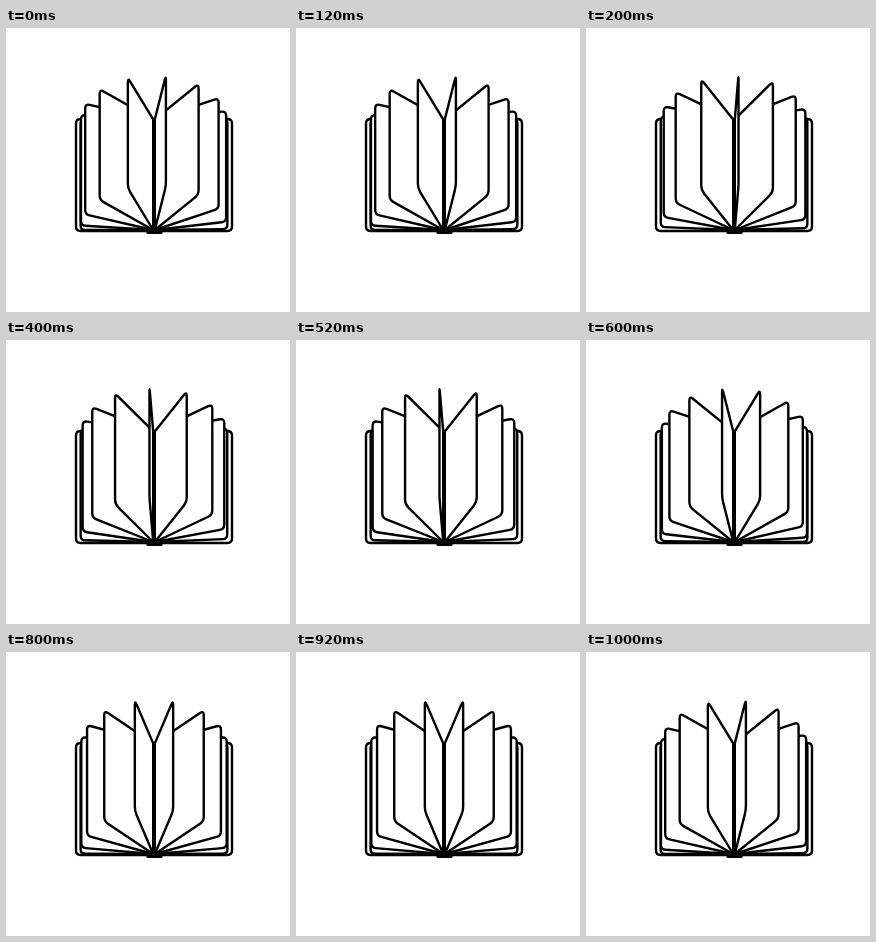
An HTML page with a canvas for the animation above (1200 ms loop, 284 by 284 pixels).

```html
<!DOCTYPE html>
<html lang="en">
<head>
<meta charset="utf-8">
<title>Book loader</title>
<style>
html, body { margin: 0; width: 100%; height: 100%; overflow: hidden; background: #fff; }
canvas { display: block; width: 284px; height: 284px; }
</style>
</head>
<body>
<canvas id="stage"></canvas>
<script>
const SIZE = 284;
const STEP_MS = 200, STEPS = 6, STEPS_PER_PAGE = 5;
const SPINE = 148, HINGE = 0.8, TOP = 91.4, BOTTOM = 202;
const COVER = 77.2, REACH = 72.6, LIFT = 44.5, CORNER = 4.5;
const GAP = 0.327, START = 0.098;

const canvas = document.getElementById('stage');
const ctx = canvas.getContext('2d');
const dpr = window.devicePixelRatio || 1;
canvas.width = canvas.height = SIZE * dpr;
ctx.scale(dpr, dpr);

// Point at distance d from a towards b
function toward(a, b, d) {
  const k = d / Math.hypot(b[0] - a[0], b[1] - a[1]);
  return [a[0] + (b[0] - a[0]) * k, a[1] + (b[1] - a[1]) * k];
}

// Sheet hinged on its side of the spine, rounded at its two outer corners
function sheet(reach, lift, top = TOP, bottom = BOTTOM) {
  const hinge = SPINE + HINGE * Math.sign(reach);
  const outer = hinge + reach;
  const hingeTop = [hinge, top], hingeBottom = [hinge, bottom];
  const outerTop = [outer, top - lift], outerBottom = [outer, bottom - lift];
  ctx.beginPath();
  ctx.moveTo(...hingeTop);
  ctx.lineTo(...toward(outerTop, hingeTop, CORNER));
  ctx.quadraticCurveTo(...outerTop, ...toward(outerTop, outerBottom, CORNER));
  ctx.lineTo(...toward(outerBottom, outerTop, CORNER));
  ctx.quadraticCurveTo(...outerBottom, ...toward(outerBottom, hingeBottom, CORNER));
  ctx.lineTo(...hingeBottom);
  ctx.closePath();
  ctx.fill();
  ctx.stroke();
}

function draw(step) {
  ctx.fillStyle = '#fff';
  ctx.strokeStyle = '#000';
  ctx.lineWidth = 2.4;
  ctx.lineJoin = ctx.lineCap = 'round';
  ctx.fillRect(0, 0, SIZE, SIZE);

  sheet(-COVER, 0, 91, 203);
  sheet(COVER, 0, 91, 203);

  // Upright pages lie in front of the flatter ones
  const shift = (step % STEPS_PER_PAGE) / STEPS_PER_PAGE;
  const pages = [];
  for (let k = -6; k <= 6; k++) {
    const u = START + GAP * (k - shift);
    if (Math.abs(u) < Math.PI / 2) pages.push(u);
  }
  pages.sort((a, b) => Math.abs(b) - Math.abs(a));
  for (const u of pages) {
    const tilt = Math.PI / 2 * Math.sin(u);
    sheet(REACH * Math.sin(tilt), LIFT * Math.cos(tilt));
  }

  ctx.lineWidth = 3.2;
  ctx.beginPath();
  ctx.moveTo(142, 204.5);
  ctx.lineTo(155, 204.5);
  ctx.stroke();
}

function tick() {
  draw(Math.floor(performance.now() / STEP_MS) % STEPS);
  requestAnimationFrame(tick);
}
tick();
</script>
</body>
</html>
```
